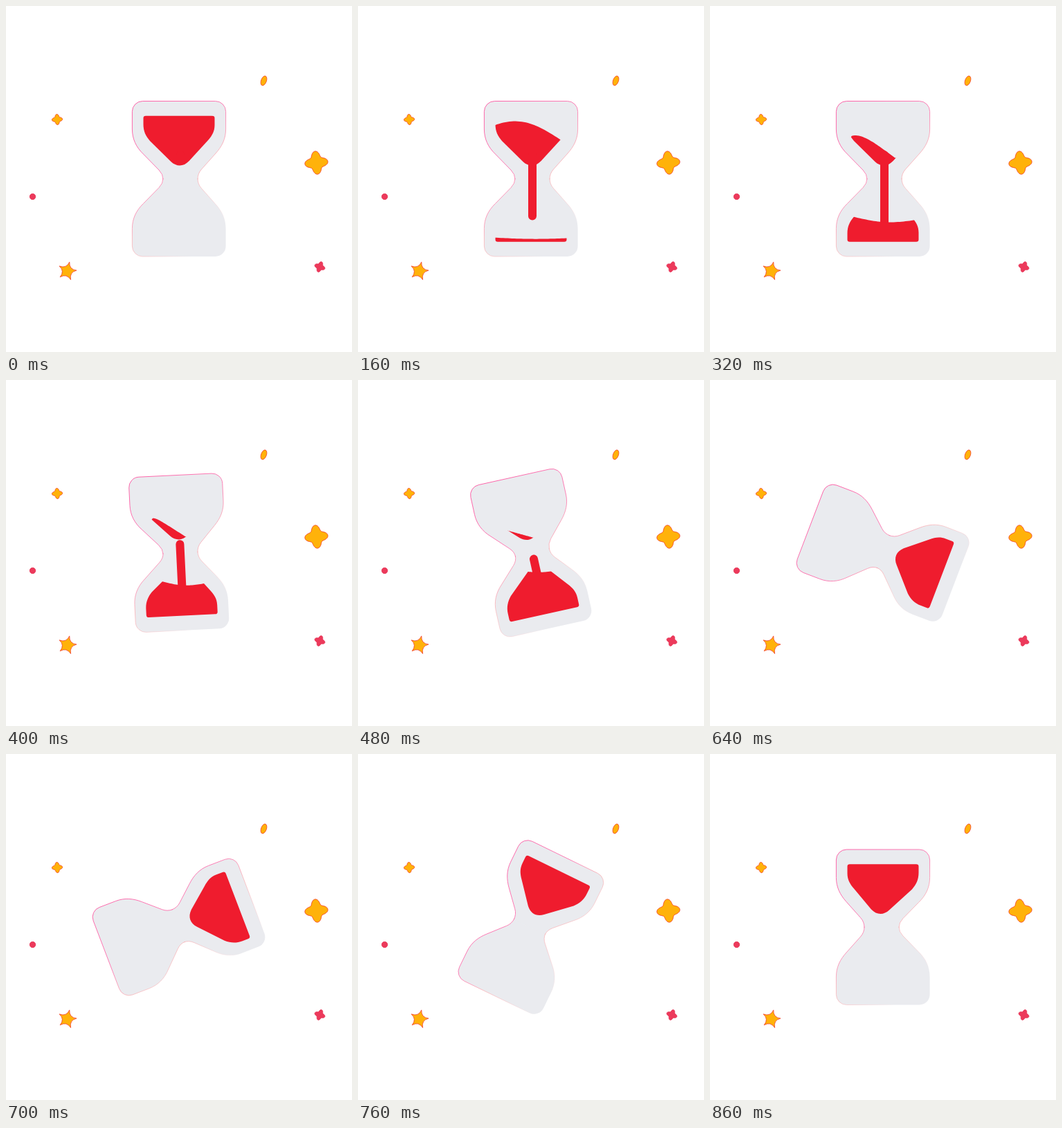
An HTML page with a canvas that plays this animation: 500x500 px, repeating every 960 ms.

```html
<!DOCTYPE html>
<html lang="en">
<head>
<meta charset="utf-8">
<title>Hourglass</title>
<style>
  html, body { margin: 0; width: 100%; height: 100%; overflow: hidden; background: #fff; }
  canvas { display: block; width: 500px; height: 500px; }
</style>
</head>
<body>
<canvas id="stage" width="500" height="500"></canvas>
<script>
const ctx = document.getElementById('stage').getContext('2d');
const { PI, sin, cos, min, max } = Math;

const LOOP = 960, BEAT = 160, DRAINED = 560;
const RED = '#ef1c2e', GLASS = '#eaebef', ORANGE = '#ffb20a', PINK = '#ec3a5b';

const moved = (path, matrix) => {
  const p = new Path2D();
  p.addPath(path, matrix);
  return p;
};

// The lower chamber mirrors the upper one
const flip = new DOMMatrix([1, 0, 0, -1, 0, 499.5]);

const bulb = new Path2D('M227 250.5Q227 243 221 237L198.5 214C188 204 182.4 192 182.4 178V152.5A15 15 0 0 1 197.4 137.5H302.6A15 15 0 0 1 317.6 152.5V178C317.6 192 312 203 303 213L282.5 236Q277 242 277 250.5');
const bulbs = [bulb, moved(bulb, flip)];

const sandShape = apex => new Path2D(
  `M202 158.7H298Q301.5 158.7 301.5 162V172C301.5 181 298 187 292 194L${apex + 13} 224` +
  `C${apex + 5} 232.5 ${apex - 5} 232.5 ${apex - 13} 225` +
  'L208 195C202 188 198.5 181 198.5 171V162Q198.5 158.7 202 158.7Z');
const upper = sandShape(251.5);
const lower = moved(sandShape(254), flip);

// Ease with handles (x1, 0) and (x2, 1)
function ease(x, x1, x2) {
  if (x <= 0) return 0;
  if (x >= 1) return 1;
  let lo = 0, hi = 1, u = 0.5;
  for (let i = 0; i < 24; i++) {
    u = (lo + hi) / 2;
    const v = 1 - u;
    if (3 * x1 * u * v * v + 3 * x2 * u * u * v + u * u * u < x) lo = u; else hi = u;
  }
  return u * u * (3 - 2 * u);
}

// Fills the part of a shape below a sloshing surface that spans wall to wall
function sand(shape, mid, halfWidth, left, right, hump, skew, floor) {
  const x0 = mid - halfWidth(left), x1 = mid + halfWidth(right);
  ctx.save();
  ctx.beginPath();
  ctx.moveTo(170, floor);
  ctx.lineTo(170, left);
  for (let s = 0; s <= 1; s += 1 / 32)
    ctx.lineTo(x0 + (x1 - x0) * s, left + (right - left) * s - hump * sin(PI * s ** skew));
  ctx.lineTo(330, right);
  ctx.lineTo(330, floor);
  ctx.clip();
  ctx.fill(shape);
  ctx.restore();
}

const wall = d => max(0, min(52, d));

function pour(k) {
  sand(upper, 250, y => wall(237 - y),
    158 + 12.5 * k + 1.7 * k * k, 158 + 71 * sin(PI * k / 6),
    14 * sin(PI * (k / 3) ** 0.63), 1 - 0.09 * k * k, 240);

  ctx.beginPath();
  ctx.moveTo(252, 215 + 44 * max(0, k - 2));
  ctx.lineTo(252, min(330, 222 + 81 * k));
  ctx.stroke();

  const rise = 30 * (k - 0.8);
  if (rise > 0)
    sand(lower, 252, y => wall(y - 261),
      341 - rise, 341 - 0.89 * rise, -5.5 * sin(PI * rise / 72), 1, 345);
}

const polar = (x, y, r, deg) => {
  const a = deg * PI / 180;
  return [x + r * sin(a), y - r * cos(a)];
};

function clover(x, y, r, turn) {
  const p = new Path2D();
  for (let a = 0; a < 360; a += 6)
    p.lineTo(...polar(x, y, r * (1 + 0.23 * cos(a * PI / 45)), a + turn));
  p.closePath();
  return p;
}

function star(x, y, outer, inner, turn) {
  const p = new Path2D();
  p.moveTo(...polar(x, y, outer, turn));
  for (let a = turn; a < turn + 359; a += 72)
    p.quadraticCurveTo(...polar(x, y, inner, a + 36), ...polar(x, y, outer, a + 72));
  p.closePath();
  return p;
}

function oval(x, y, rx, ry, deg) {
  const p = new Path2D();
  p.ellipse(x, y, rx, ry, deg * PI / 180, 0, PI * 2);
  return p;
}

const confetti = [
  [oval(372.5, 108, 3.9, 7.2, 20), ORANGE],
  [clover(74, 164, 6.2, -4), ORANGE],
  [clover(448.5, 226.5, 13.6, -6), ORANGE],
  [star(88.5, 383, 13.5, 3.4, 14), ORANGE],
  [oval(38.5, 275.5, 4.2, 4.2, 0), PINK],
  [clover(453.5, 377, 6.3, 20), PINK]
];

// Rim light stays fixed to the stage while the glass turns
const rim = ctx.createLinearGradient(170, 150, 325, 305);
rim.addColorStop(0, '#ff3d94');
rim.addColorStop(0.45, '#ff5fa4');
rim.addColorStop(0.65, '#f9b0b4');
rim.addColorStop(1, 'rgba(249,176,180,0)');

function draw(t) {
  ctx.fillStyle = '#fff';
  ctx.fillRect(0, 0, 500, 500);

  ctx.lineWidth = 0.8;
  for (const [shape, color] of confetti) {
    ctx.fillStyle = color;
    ctx.fill(shape);
    ctx.strokeStyle = color === PINK ? '#e62e52' : '#f23a26';
    ctx.stroke(shape);
  }

  const angle = -180 * ease((t - 320) / 540, 0.735, 0.675);
  const turn = new DOMMatrix().translate(250, 250).rotate(angle).translate(-250, -250);
  const body = bulbs.map(b => moved(b, turn));
  ctx.fillStyle = GLASS;
  body.forEach(b => ctx.fill(b));
  ctx.strokeStyle = rim;
  body.forEach(b => ctx.stroke(b));

  ctx.save();
  ctx.setTransform(turn);
  ctx.fillStyle = ctx.strokeStyle = RED;
  ctx.lineWidth = 12;
  ctx.lineCap = 'round';
  if (t < DRAINED) pour(t / BEAT);
  else ctx.fill(lower);
  ctx.restore();
}

const start = performance.now();
function tick() {
  draw((performance.now() - start) % LOOP);
  requestAnimationFrame(tick);
}
tick();
</script>
</body>
</html>
```
